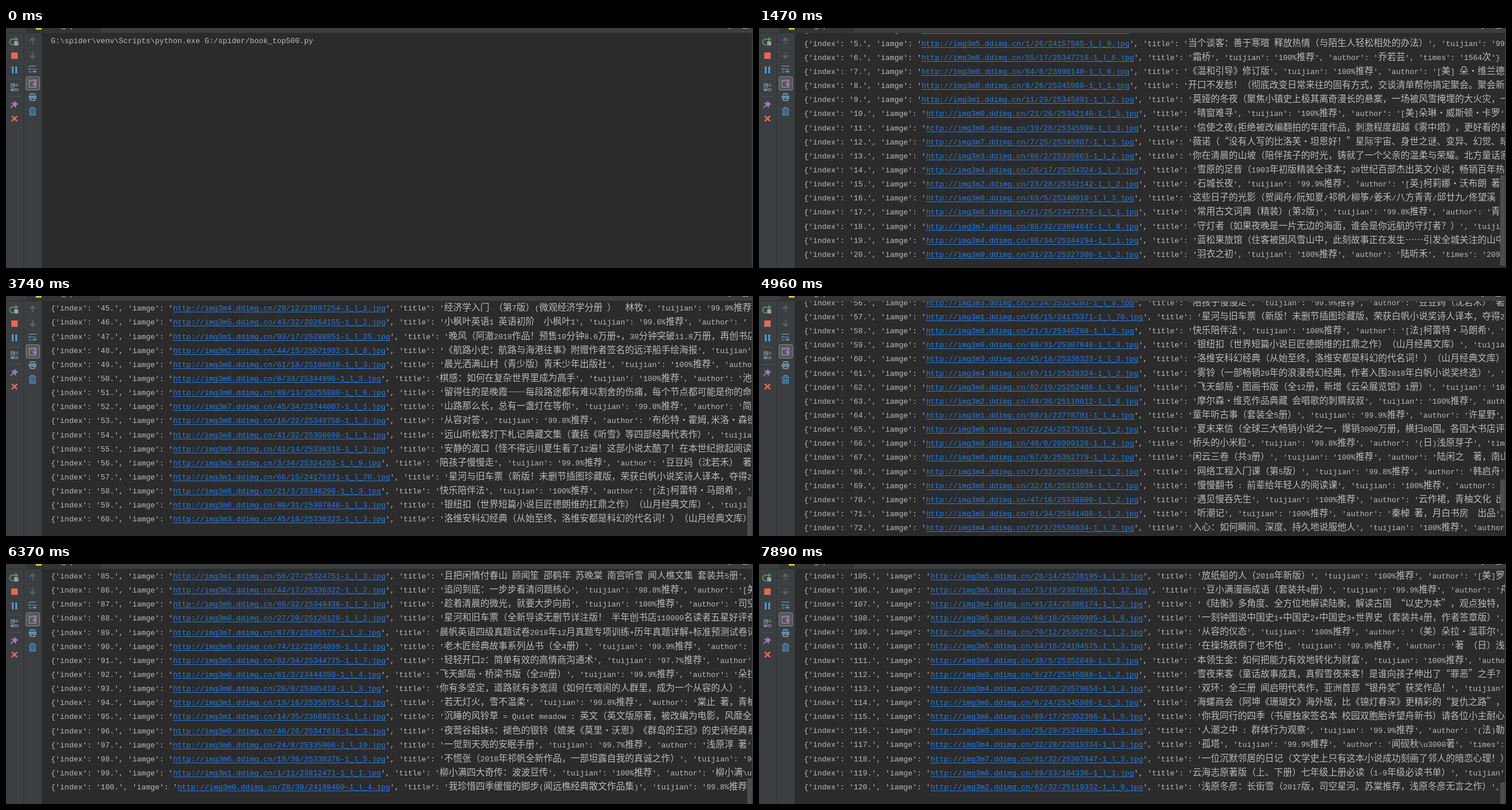
Write an HTML page that moves like this. It is 1280 px wide and 412 px high and loops after 8 s.

```html
<!DOCTYPE html>
<html lang="zh-CN">
<head>
<meta charset="utf-8">
<style>
  html, body { margin: 0; width: 100%; height: 100%; overflow: hidden; background: #2b2b2b; }
  svg, .pane, #thumb { position: absolute; left: 0; top: 0; }
  .pane { left: 62px; width: 1217px; overflow: hidden; }
  .list { position: absolute; left: 15px; width: 1202px; overflow: hidden; }
  .row {
    height: 24.15px; line-height: 24.15px; position: relative; top: 2px; white-space: pre; color: #bbb;
    font-family: "Liberation Mono", monospace; font-size: 12.92px; font-kerning: none; text-spacing-trim: space-all;
  }
  .row i { font: 300 15.5px/0 "Noto Sans CJK SC", "Noto Sans CJK", sans-serif; }
  .row u { color: #287bde; text-underline-offset: 2px; text-decoration-thickness: 1px; text-decoration-skip-ink: none; }
  #thumb { left: 1270px; width: 9px; background: #4b4c4d; }
</style>
</head>
<body>
<div class="pane" style="top:9px;height:230px"><div class="list"></div></div>
<div class="pane" style="top:239px;height:173px"><div class="list"></div></div>
<div id="thumb"></div>
<svg width="1280" height="412" fill="none">
  <path fill="#3c3f41" d="M0 0H1280V9H62V412H0zM1278 9h2v403h-2z"/>
  <path fill="#323435" d="M35 0h127v8H35z"/>
  <path stroke="#2f3133" d="M0 8.5H1280M30.5 9V412M61.5 9V412"/>
  <path fill="#d8c22c" d="M51 0h10v3H51z"/>
  <path fill="#aaa" d="M95 1h7v1h-7zM111 0h1v3h-1zM1238 0h4v1h-4zM1262 0h10v1h-10z"/>
  <path stroke="#777a7c" stroke-dasharray="1 2" d="M5 87.5h21M5 117.5h21"/>
  <!-- left column -->
  <path stroke="#499c54" stroke-width="2" d="M13 28.5A5 5 0 1 1 14 19.5H17"/>
  <path fill="#499c54" d="M16 15l5 4.5-5 4.500z"/>
  <path fill="#9da0a2" d="M14 23h7v7h-7z"/>
  <path fill="#e06a5a" d="M9 42h11v11H9z"/>
  <path fill="#4a9fd0" d="M10 66h3v12h-3zM16 66h3v12h-3z"/>
  <path stroke="#9da0a2" d="M8.500 95.500h6v6h-6zM16 96.500h5M16 99.500h5M8.500 104.500h12v3h-12z"/>
  <path fill="#4a9fd0" d="M10 97h4v2h-4zM10 105h3v2h-3z"/>
  <path fill="#a678b8" d="M14 125l7 6-3 1-2 4-6-6 4-2z"/>
  <path stroke="#a678b8" stroke-width="2" d="M12 133l-4 4M10 128l7 8"/>
  <path stroke="#e06a5a" stroke-width="2.500" d="M10 151l9 9M19 151l-9 9"/>
  <!-- right column -->
  <path stroke="#606365" stroke-width="2" d="M45.500 28V18M41 22l4.500-5 4.500 5M45.500 41V51M41 47l4.500 5 4.500-5"/>
  <path stroke="#9da0a2" d="M39 65.500h13M39 75.500h5M47 75.500h5"/>
  <path stroke="#4a9fd0" d="M39 70.500h12v4h-5M48 72l-2 2.500 2 2.500M41 68l-2 2.500 2 2.500"/>
  <rect x="34.500" y="83.500" width="23" height="23" rx="2" fill="#55585a" stroke="#85888a"/>
  <path stroke="#9da0a2" d="M39.500 89.500h12v12h-12zM40 91.500h6"/>
  <path stroke="#b070cc" stroke-width="2" d="M49 88v9M46 95l3 4 3-4"/>
  <path fill="#4a9fd0" d="M39 116h13v6h-2v-3h-9v3h-2z"/>
  <path stroke="#9da0a2" stroke-width="1.500" d="M42 115v-2h7v2M42 120.500h7v4h-7z"/>
  <path stroke="#4a9fd0" stroke-width="1.500" d="M39 139.500h13M43 138v-1.500h5v1.500M41 141v8.500h9V141M44 142v6M47 142v6"/>
</svg>
<script>
const ROW = 24.15, LOOP = 8000;

// image path | title | rating | author | sales; every page lists its last 16 of 20 books
const books = String.raw`
5/1/26/24157585-1_l_9|当个谈客：善于寒暄 释放热情（与陌生人轻松相处的办法）|99.8
8/55/17/25347718-1_l_6|霜桥|100|乔若芸|1564
0/64/6/23990140-1_l_6|《温和引导》修订版|100|[美] 朵・维兰德
8/8/26/25345988-1_l_1|开口不发愁！（彻底改变日常来往的固有方式，交谈清单帮你搞定聚会。聚会新手
1/11/29/25345991-1_l_2|莫娅的冬夜（聚焦小镇史上极其离奇漫长的悬案，一场被风雪掩埋的大火灾，一
0/21/26/25342140-1_l_5|晴窗难寻|100|[美]朵琳・威斯顿・卡罗
0/10/28/25345990-1_l_3|信使之夜(拒绝被改编翻拍的年度作品，刺激程度超越《雾中塔》，更好看的悬疑
7/7/25/25345987-1_l_3|薇诺（“没有人写的比洛芙・坦恩好！”星际宇宙、身世之谜、变异、幻觉、暗夜
3/80/2/25335863-1_l_2|你在清晨的山坡（陪伴孩子的时光，铸就了一个父亲的温柔与荣耀。北方童话家
4/26/17/25334324-1_l_2|雪原的足音（1903年初版精装全译本；20世纪百部杰出英文小说；畅销百年热卖
2/23/28/25342142-1_l_2|石城长夜|99.9|[英]柯莉娜・沃布朗 著，
0/69/5/25340010-1_l_3|这些日子的光影（贺闻舟/阮知夏/祁帆/柳筝/姜禾/八方青青/邱廿九/佟望溪 等
6/21/25/23477376-1_l_1|常用古文词典（精装）(第2版)|99.8|青禾书局
7/86/32/23694647-1_l_8|守灯者（如果夜晚是一片无边的海面，谁会是你远航的守灯者？）
4/96/34/25344294-1_l_1|蓝松果旅馆（住客被困风雪山中，此刻故事正在发生……引发全城关注的山中
0/31/23/25327300-1_l_2|羽衣之初|100|陆听禾|20954
2/65/14/25325552-1_l_5|松果林童话|100|(丹麦) 约恩・斯托芬格
5/96/23/25069965-1_l_20|哎呀，外婆！山羊会飞（一个北方邮差的牧场手记：与羊群邂逅在阳光之国南
7/98/25/25069967-1_l_7|《猫咪“萝卜”的冬天》（暖心童话故事，孩子们的最爱。）
1/96/22/24157581-1_l_15|光彩满堂：如何打动、亲近和鼓励他人（一本改变人生思维方式的魔力读物，
7/49/4/25301677-1_l_9|闲话时光 顾闻笙经典文集 叶小满彩色漫画插图
4/95/22/25069964-1_l_19|风车旧约（《晨间书页》畅销书获奖作品中文首发：一座重获新生的山顶风车
5/89/4/1455456905-1_l_29|中级会计职称教材2019全套精编版 会计中级职称考试2019 经济法财务管理
2/48/13/25165452-1_l_9|小院灯下读诗词 第一辑 春夏秋冬 套装共4册|99.9
7/77/24/25248047-1_l_6|朵菲的神秘花园|100|朵菲・卡伦斯顿 著
1/66/0/25324761-1_l_3|沉默的沙丘（蒙尘70年的世纪文学经典，长桥书屋、《四季书刊》百大英语小说
4/0/25/24157584-1_l_12|镜像版记忆（如果你脑子里的一切都被计算机复制，会发生什么事？国际悬疑
3/98/24/24157583-1_l_14|雪线之外（白桦林文学奖得主讲述一个奇迹生还的真实故事。生命力战胜医学
7/21/4/25251357-1_l_6|鹿王的秋天（暖心童话故事，孩子们的最爱。）|99.9
2/97/23/24157582-1_l_13|张口就来，落落大方：令人印象深刻的即兴演说书（成功与否并不取决于经验
3/71/27/25298333-1_l_6|残谱（北国“悬疑新星”沃林顿的成名作。 一张曲谱连通现在和过去，人性的
3/70/24/25352683-1_l_3|走到自己喜欢的地方(书屋独家限量签名本)
4/20/12/23697254-1_l_1|经济学入门 （第7版）(微观经济学分册 ）  林牧|99.9
5/43/32/20264155-1_l_2|小枫叶英语1 英语初阶　小枫叶1|99.6|（
1/93/17/25288851-1_l_25|晚风（阿澈2018作品！预售10分钟8.6万册+，30分钟突破11.8万册，再创书店
2/44/15/25071992-1_l_8|《航路小史：航路与海港往事》附赠作者签名的远洋船手绘海报
8/61/18/25100818-1_l_3|晨光洒满山村（青少版）青禾少年出版社
6/6/33/25344996-1_l_3|棋感：如何在复杂世界里成为高手|100|池望
0/89/13/25255880-1_l_6|留得住的是晚霞——每段路途都有难以割舍的伤痛，每个节点都可能是你的命运
7/45/34/23744007-1_l_1|山路那么长，总有一盏灯在等你|99.8|简禾
8/16/22/25349758-1_l_3|从容对答|99.8|布伦特・霍姆,米洛・森德
8/41/32/25308698-1_l_1|远山听松客灯下札记典藏文集（囊括《听雪》等四部经典代表作）
9/41/14/25336319-1_l_3|安静的渡口（怪不得远川夏生看了12遍！这部小说太酷了！在本世纪掀起阅读
3/3/34/25324203-1_l_9|陪孩子慢慢走|99.9|豆豆妈（沈若禾） 著
1/66/15/24175371-1_l_70|星河与旧车票（新版！未删节插图珍藏版，荣获白帆小说奖诗人译本，夺得20
8/21/3/25346298-1_l_3|快乐陪伴法|100|[法]柯蕾特・马朗希
6/80/31/25307846-1_l_3|银纽扣（世界短篇小说巨匠德朗维的扛鼎之作）（山月经典文库）
3/45/18/25336323-1_l_3|洛维安科幻经典（从始至终，洛维安都是科幻的代名词！）（山月经典文库）
6/22/24/25275316-1_l_2|夏末来信（全球三大畅销小说之一，爆销3000万册，横扫80国。各国大书店评分
8/40/0/20999128-1_l_4|桥头的小米粒|99.8|(日)浅原芽子
9/67/9/25352779-1_l_2|闲云三卷（共3册）|100|陆闲之　著，南山
4/71/32/25233884-1_l_2|网络工程入门课（第5版）|99.8|韩启舟
6/32/16/25313936-1_l_7|慢慢翻书 : 前辈给年轻人的阅读课
0/47/16/25338800-1_l_2|遇见慢吞先生|100|云作裙，青柚文化 出品
8/81/34/25341408-1_l_2|听潮记|100|秦棹 著，月白书房　出品
4/73/3/25536034-1_l_3|入心：如何瞬间、深度、持久地说服他人
4/65/11/25328324-1_l_2|雾铃（一部畅销20年的浪漫奇幻经典，作者入围2018年白帆小说奖终选）
8/82/19/25252408-1_l_6|飞天邮局・图画书版（全12册，新增《云朵展览馆》1册）
2/48/36/25110012-1_l_6|摩尔森・维克作品典藏 会唱歌的刺猬叔叔
1/80/1/23778791-1_l_4|童年听古事（套装全5册）|99.9|许星野
5/56/4/23761145-1_l_2|旧町无雨（日本小说家远川夏的自传体小说）|99.8
9/77/23/25295369-1_l_9|山脚有间杂货铺|99.9|程又安 著,青柚文化
9/45/19/25347609-1_l_7|她与海同眠（全二册）（人气作家晚棹甜蜜深情之作。顾船的归途，是大海，
0/17/23/25338770-1_l_2|专注课.实操篇|100|艾琳・布鲁克菲尔
1/56/27/25324751-1_l_3|且把闲情付春山 顾闻笙 邵鹤年 苏晚棠 南宫听雪 闻人樵文集 套装共5册
2/44/17/25336322-1_l_2|追问到底：一步步看清问题核心|98.8|[美]
6/80/32/25348436-1_l_3|趁着清晨的微光，就要大步向前|100|司空望
8/27/20/25126128-1_l_2|星河和旧车票（全新导读无删节详注版！ 半年创书店110000名读者五星好评奇迹
7/87/9/25295577-1_l_2|晨帆英语四级真题试卷2018年12月真题专项训练+历年真题详解+标准预测试卷词
9/74/12/21054899-1_l_2|老木匠经典故事系列丛书（全4册）|99.9
5/82/34/25344775-1_l_7|轻轻开口2：简单有效的高情商沟通术|97.7
0/61/3/23444350-1_l_4|飞天邮局・桥梁书版（全20册）|99.9|朵拉・
0/20/0/25305410-1_l_3|你有多坚定，道路就有多宽阔（如何在喧闹的人群里，成为一个从容的人）
1/19/16/25350751-1_l_3|若无灯火，雪不温柔|99.8|棠止 著，青柚
1/14/35/23669231-1_l_1|沉睡的风铃草 = Quiet meadow : 英文（英文版原著，被改编为电影，风靡全世界
0/46/20/25347610-1_l_3|夜莺谷姐妹5：褪色的银铃（媲美《莫里・沃恩》《群岛的王冠》的史诗经典系列
6/24/8/25335906-1_l_19|一觉到天亮的安眠手册|99.7|浅原淳 著
6/19/36/25338376-1_l_5|不慌张（2018年祁帆全新作品，一部坦露自我的真诚之作）|99.8
1/1/11/23812471-1_l_1|柳小满四大奇传：波波豆传|100|柳小满\u3000著
0/28/30/24198400-1_l_4|我珍惜四季缓慢的脚步(闻远樵经典散文作品集)|99.8
5/26/14/25238195-1_l_3|放纸船的人（2018年新版）|100|[美]罗恩
5/73/19/23976685-1_l_12|豆小满漫画成语（套装共4册）|99.9|舟
4/91/24/25306174-1_l_2|《陆衡》多角度、全方位地解读陆衡，解读古国 “以史为本”，观点独特，评述
5/60/18/25309905-1_l_6|一刻钟图说中国史1+中国史2+中国史3+世界史（套装共4册，作者签章版）
2/70/12/25352782-1_l_2|从容的仪态|100|（美）朵拉・温菲尔
5/64/16/24194575-1_l_3|在操场跌倒了也不怕|99.9|著 （日）浅
9/38/5/25352849-1_l_2|本领生金：如何把能力有效地转化为财富
9/9/27/25345989-1_l_2|雪夜来客（童话故事成真，真假雪夜来客！是谁向孩子伸出了“罪恶”之手？
4/32/35/23579654-1_l_3|双环：全三册 闻启明代表作，亚洲首部“银舟奖”获奖作品！
6/6/24/25345986-1_l_2|海螺商会（阿坤《珊瑚女》海外版，比《锦灯春深》更精彩的“复仇之路”，
6/89/17/25352306-1_l_5|你我同行的四季（书屋独家签名本 校园双胞胎许望舟新书）请各位小主耐心等待
9/25/29/25246609-1_l_1|人潮之中 : 群体行为观察|99.9|(法)勒内
4/32/28/22819334-1_l_3|孤塔|99.9|闻砚秋\u3000著|30718
7/81/32/25307847-1_l_3|一位沉默邻居的日记（文学史上只有这本小说成功刻画了邻人的暗恋心理！）
6/89/33/104336-1_l_1|云海志原著版（上、下册）七年级上册必读（1-9年级必读书单）
2/62/32/25119332-1_l_9|浅原冬彦：长街雪（2017版，司空星河、苏棠推荐，浅原冬彦无言之作）`.trim().split('\n');

const wide = text => text.replace(/[^\x00-\xff]+/g, '<i>$&</i>');
const rowHtml = html => `<div class="row">${wide(html)}</div>`;

function bookRow(n) {
  const page = Math.floor((n - 1) / 20), slot = (n - 1) % 20 - 4;
  const book = books[page * 16 + (slot < 0 ? slot + 12 : slot)];
  const [path, title, rate = 100, author = '佚名', sold = 1280] = book.split('|');
  const url = `http://img3m${path[0]}.ddimg.cn${path.slice(1)}.jpg`;
  return rowHtml(`{'index': '${n}.', 'iamge': '<u>${url}</u>', 'title': '${title}', ` +
    `'tuijian': '${rate}%推荐', 'author': '${author}', 'times': '${sold}次'}`);
}

const command = String.raw`G:\spider\venv\Scripts\python.exe G:/spider/book_top500.py`;
const lists = [...document.querySelectorAll('.list')];
const html = rowHtml(command) + Array.from({ length: 120 }, (_, i) => bookRow(i + 1)).join('');
lists.forEach(list => list.innerHTML = html);

// start time, first visible row, rows printed, first row of a late-painted lower half
const states = [
  [0, 0, 0], [1030, 4.48, 20], [1470, 4.8, 20], [1630, 5, 20],
  [1780, 14.4, 40], [1920, 25, 40], [3600, 25, 60, 36.6], [3740, 45, 60],
  [4960, 56.4, 80], [5100, 65, 80], [6230, 76.4, 100], [6370, 85, 100],
  [7750, 96.4, 120], [7890, 105, 120],
];
const thumb = document.getElementById('thumb');
let shown;

function draw(now) {
  const t = now % LOOP;
  const state = states.findLast(s => s[0] <= t);
  if (state !== shown) {
    shown = state;
    const [, top, count, lower = top] = state;
    [top, lower].forEach((first, i) => {
      lists[i].style.top = Math.round(-first * ROW) - i * 230 + 'px';
      lists[i].style.height = (count + 1) * ROW + 'px';
    });
    const size = 425 / (1 + count / 11.5);
    const lag = count ? (count - 15 - lower) / count * 403 : 0;
    thumb.style.display = count ? 'block' : 'none';
    thumb.style.top = 412 - size - lag + 'px';
    thumb.style.height = size + 'px';
  }
  requestAnimationFrame(draw);
}
draw(performance.now());
</script>
</body>
</html>
```
